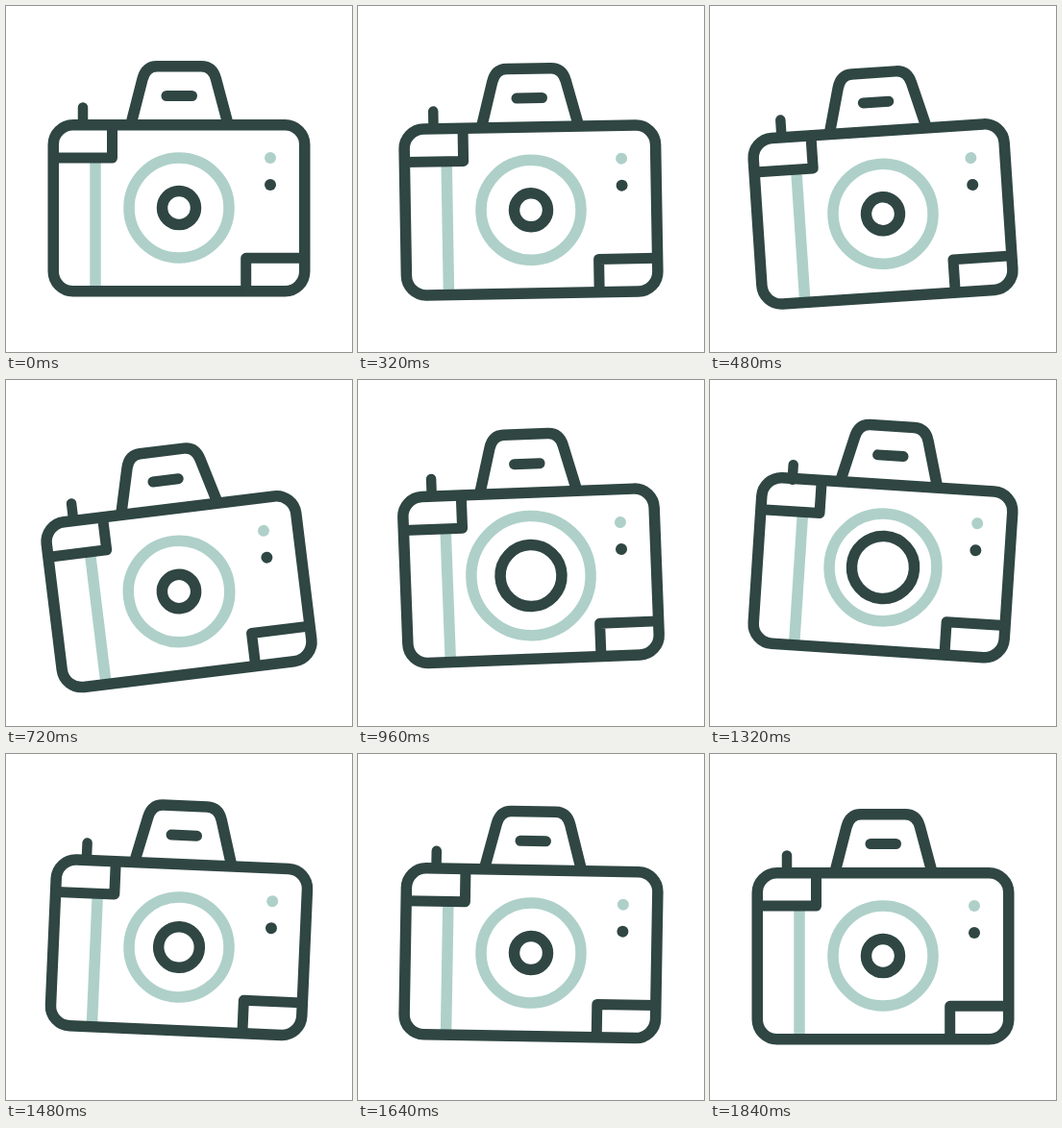
Recreate the animation shown at these times as an HTML page. Size 360 by 360 pixels, loop 1.92 s.

```html
<!DOCTYPE html>
<html lang="en">
<head>
<meta charset="utf-8">
<title>Camera</title>
<style>
  html, body { margin: 0; width: 100%; height: 100%; overflow: hidden; background: #fff; }
  svg { display: block; width: 100%; height: 100%; }
  .dark { stroke: #2f4643; }
  .light { stroke: #aed0c9; }
  .line { fill: none; stroke-width: 11.5; stroke-linecap: round; stroke-linejoin: round; }
</style>
</head>
<body>
<svg viewBox="0 0 360 360">
  <g id="camera" class="line">
    <path class="light" stroke-linecap="butt" style="stroke-linecap: butt" d="M93 160V293"/>
    <path id="shutter" class="dark" stroke-width="10.5" style="stroke-width: 10.5" d="M80 105.5V121"/>
    <path class="dark" d="M130.5 121L142 76Q145.5 62.8 157 62.8H203Q215 62.8 218.5 76L230.5 121"/>
    <path class="dark" style="stroke-width: 11" d="M167 93.5H193.5"/>
    <rect class="dark" x="49.25" y="123.7" width="261.5" height="173" rx="20.5"/>
    <path class="dark" style="stroke-width: 11" d="M50 158H110.5V124M310 262.3H249.7V296"/>
    <circle id="ring" class="light" cx="180" cy="210" r="52"/>
    <circle id="iris" class="dark" cx="180" cy="210" r="17.5"/>
    <circle cx="275" cy="158" r="6" fill="#aed0c9"/>
    <circle cx="275" cy="186" r="6" fill="#2f4643"/>
  </g>
</svg>
<script>
  const LOOP = 1920, STEP = 40;

  // Each track lists [time in ms, value]; values ease between neighbours.
  const tracks = {
    lift:  [[140, 0], [720, 10], [1150, -18], [1810, 0]],
    turn:  [[190, 0], [740, -7], [1220, 4], [1840, 0]],
    ring:  [[660, 52], [1060, 64], [1480, 52]],
    iris:  [[700, 17.5], [1140, 40.3], [1600, 17.5]],
    press: [[960, 0], [1140, 7.5], [1520, 0]]
  };

  const el = id => document.getElementById(id);
  const camera = el('camera'), shutter = el('shutter'), ring = el('ring'), iris = el('iris');
  const ease = p => p * p * (3 - 2 * p);

  function valueAt(keys, t) {
    if (t <= keys[0][0]) return keys[0][1];
    for (let i = 1; i < keys.length; i++) {
      const [t0, a] = keys[i - 1], [t1, b] = keys[i];
      if (t <= t1) return a + (b - a) * ease((t - t0) / (t1 - t0));
    }
    return keys[keys.length - 1][1];
  }

  function draw(t) {
    const at = name => valueAt(tracks[name], t);
    camera.setAttribute('transform', `translate(0 ${at('lift')}) rotate(${at('turn')} 180 210)`);
    shutter.setAttribute('transform', `translate(0 ${at('press')})`);
    ring.setAttribute('r', at('ring'));
    iris.setAttribute('r', at('iris'));
  }

  const start = performance.now();
  function tick() {
    const t = Math.max(0, performance.now() - start) % LOOP;
    draw(Math.floor(t / STEP) * STEP);
    requestAnimationFrame(tick);
  }
  tick();
</script>
</body>
</html>
```
